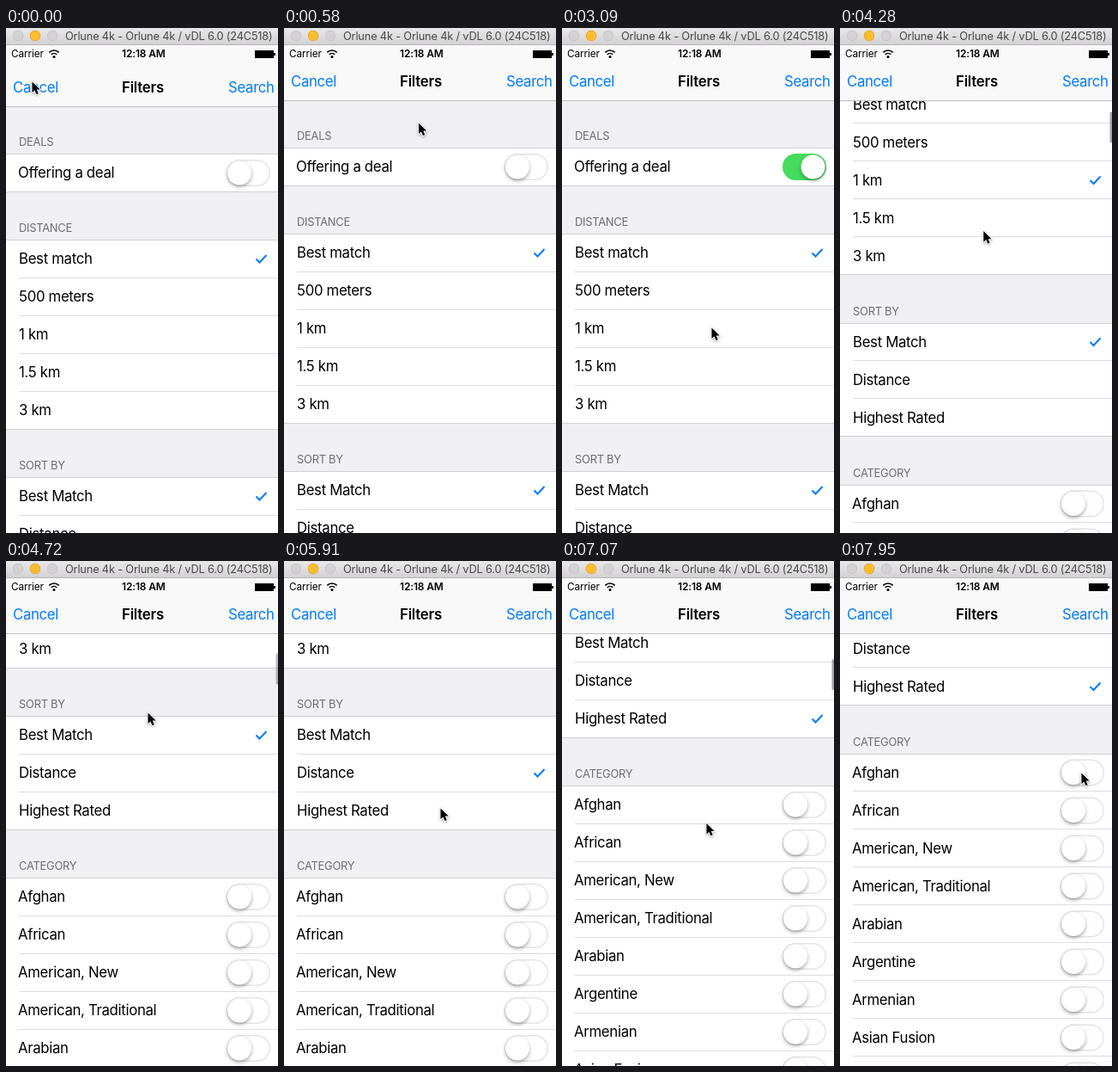
Animation, 317 px wide and 587 px high, one loop 8000 ms. Source, as an HTML page with a canvas:

```html
<!DOCTYPE html>
<html lang="en">
<head>
<meta charset="utf-8">
<title>Filters</title>
<style>
  html, body { margin: 0; width: 317px; height: 587px; overflow: hidden; }
  canvas { display: block; }
</style>
</head>
<body>
<canvas id="stage" width="317" height="587"></canvas>
<script>
const W = 317, H = 587, LOOP = 8000, STEP = 147.4, ROW = 44, GAP = 56;
const BLUE = '#007aff', LINE = '#cfced3';
const ctx = document.getElementById('stage').getContext('2d');

// Each move eases to a point, then rests.
const START = { x: 30, y: 61 };
const MOVES = [
  { from: 0, to: 8, x: 283, y: 157 },    // reach the switch
  { from: 11, to: 14, x: 281, y: 68 },
  { from: 16, to: 20, x: 174, y: 347 },  // pick "1 km"
  { from: 24, to: 27, x: 172, y: 405 },
  { from: 27, to: 30, x: 165, y: 175 },  // drag the list up
  { from: 32, to: 37, x: 168, y: 242 },  // pick "Distance"
  { from: 37, to: 40, x: 182, y: 286 },  // pick "Highest Rated"
  { from: 42, to: 46, x: 168, y: 422 },
  { from: 46, to: 49, x: 168, y: 262 },  // drag again
  { from: 51, to: 54, x: 281, y: 245 }
];
const SCROLLS = [
  { from: 26.92, to: 31, by: 335 },
  { from: 46, to: 49, by: 144.5 }
];

const SECTIONS = [
  { title: 'DEALS', rows: ['Offering a deal'], toggles: true, active: s => s < 10 ? -1 : 0 },
  { title: 'DISTANCE', rows: ['Best match', '500 meters', '1 km', '1.5 km', '3 km'],
    active: s => s < 24 ? 0 : 2 },
  { title: 'SORT BY', rows: ['Best Match', 'Distance', 'Highest Rated'],
    active: s => s < 37 ? 0 : s < 42 ? 1 : 2 },
  { title: 'CATEGORY', toggles: true, active: () => -1,
    rows: ['Afghan', 'African', 'American, New', 'American, Traditional', 'Arabian',
           'Argentine', 'Armenian', 'Asian Fusion', 'Australian'] }
];

const clamp = v => Math.min(1, Math.max(0, v));

function ease(s, { from, to }) {
  const p = clamp((s - from) / (to - from));
  return p * p * (3 - 2 * p);
}

function cursorAt(s) {
  return MOVES.reduce((pos, move) => {
    const p = ease(s, move);
    return { x: pos.x + (move.x - pos.x) * p, y: pos.y + (move.y - pos.y) * p };
  }, START);
}

function scrollAt(s) {
  const sum = SCROLLS.reduce((total, scroll) => total + scroll.by * ease(s, scroll), 0);
  return Math.round(sum * 2) / 2;
}

// The scroll bar shows while the list moves, then fades.
function barAlpha(s) {
  return Math.max(...SCROLLS.map(({ from, to }) => clamp(s - from) * clamp((to + 2.5 - s) / 2)));
}

function rect(x, y, w, h, color) {
  ctx.fillStyle = color;
  ctx.fillRect(x, y, w, h);
}

function pill(x, y, w, h, color) {
  ctx.beginPath();
  ctx.roundRect(x, y, w, h, Math.min(w, h) / 2);
  ctx.fillStyle = color;
  ctx.fill();
}

function disc(x, y, r, color) {
  pill(x - r, y - r, 2 * r, 2 * r, color);
}

function path(points, close) {
  ctx.beginPath();
  points.forEach(([x, y]) => ctx.lineTo(x, y));
  if (close) ctx.closePath();
}

function stroke(color, width) {
  ctx.strokeStyle = color;
  ctx.lineWidth = width;
  ctx.stroke();
}

function shadow(blur, offset) {
  ctx.shadowColor = 'rgba(0,0,0,.35)';
  ctx.shadowBlur = blur;
  ctx.shadowOffsetY = offset;
}

function text(str, x, baseline, size = 16.8, color = '#000', spacing = -.33, weight = 400) {
  ctx.font = `${weight} ${size}px Inter, sans-serif`;
  ctx.letterSpacing = spacing + 'px';
  ctx.fillStyle = color;
  ctx.fillText(str, x, baseline);
}

function toggle(y, on) {
  pill(257, y - 15, 51, 31, on ? '#44db5e' : '#e4e4e4');
  if (!on) pill(258.5, y - 13.5, 48, 28, '#fff');
  ctx.save();
  shadow(4, 2);
  disc(on ? 292.5 : 272, y + .5, 14, '#fff');
  ctx.restore();
}

function check(y) {
  path([[291.5, y + .5], [295.5, y + 4.5], [303.5, y - 4]]);
  stroke(BLUE, 2);
}

function section({ title, rows, toggles, active }, y, s) {
  const top = Math.round(y), bottom = Math.floor(y + rows.length * ROW);
  text(title, 15, top - 9.5, 12.9, '#6d6d72', -.25);
  rect(0, top, W, bottom - top, '#fff');
  rows.forEach((label, i) => {
    const edge = y + i * ROW, mid = edge + ROW / 2;
    if (i) rect(15, Math.floor(edge), W, 1, '#dddce0');
    text(label, toggles ? 14 : 15, Math.round(mid) + 6);
    if (toggles) toggle(mid, i === active(s));
    else if (i === active(s)) check(mid);
  });
  rect(0, top, W, 1, LINE);
  rect(0, bottom, W, 1, LINE);
}

function statusBar() {
  text('Carrier', 6, 34.3, 11.8, '#000', -.1);
  for (const r of [4.5, 8]) {
    ctx.beginPath();
    ctx.arc(56, 34, r, -2.36, -.78);
    stroke('#000', 1.6);
  }
  disc(56, 33.5, 1.5, '#000');
  text('12:18 AM', 135, 34.3, 11.9, '#000', -.1, 600);
  rect(290, 26, 22, 9, '#000');
  rect(312, 29, 2, 3, '#000');
}

function windowBar() {
  const g = ctx.createLinearGradient(0, 0, 0, 20);
  g.addColorStop(0, '#e9e8e9');
  g.addColorStop(1, '#d2d0d2');
  rect(0, 0, W, 20, g);
  rect(0, 19, W, 1, '#b8b6b8');
  ['#d3d1d3', '#fdbd2f', '#d3d1d3'].forEach((color, i) => {
    disc(14 + i * 20, 9, 6.2, i === 1 ? '#dfa023' : '#c4c2c4');
    disc(14 + i * 20, 9, 5.5, color);
  });
  text('Orlune 4k - Orlune 4k / vDL 6.0 (24C518)', 69, 14, 12.8, '#484748', -.18);
}

function navBar(slide) {
  rect(0, 20, W, 64 + slide, '#f9f9f9');
  rect(0, 84 + slide, W, 1, '#bfbfc2');
  text('Cancel', 8, 68 + slide, 16.8, BLUE);
  text('Filters', 135, 68 + slide, 16.8, '#000', -.2, 600);
  text('Search', 259, 68 + slide, 16.8, BLUE);
}

function pointer({ x, y }) {
  ctx.save();
  ctx.translate(x, y + 1);
  ctx.scale(.9, .9);
  path([[.5, .5], [.5, 14.5], [3.8, 11.6], [6, 16.8], [8.6, 15.7], [6.4, 10.6], [10.8, 10.6]], true);
  shadow(3, 1);
  stroke('#fff', 2);
  ctx.shadowColor = 'transparent';
  ctx.fillStyle = '#000';
  ctx.fill();
  ctx.restore();
}

function draw(now) {
  const s = Math.floor((now % LOOP + 15) / STEP);
  const slide = s === 0 ? 7 : 0; // the sheet is still settling
  const scroll = scrollAt(s);

  rect(0, 0, W, H, '#efeff4');
  let y = 139 + slide - scroll;
  for (const part of SECTIONS) {
    section(part, y, s);
    y += part.rows.length * ROW + GAP;
  }
  pill(314.5, 87 + scroll * .061, 3, 36, `rgba(0,0,0,${.35 * barAlpha(s)})`);
  navBar(slide);
  statusBar();
  windowBar();
  pointer(cursorAt(s));
}

function tick() {
  draw(performance.now());
  requestAnimationFrame(tick);
}
tick();
</script>
</body>
</html>
```
